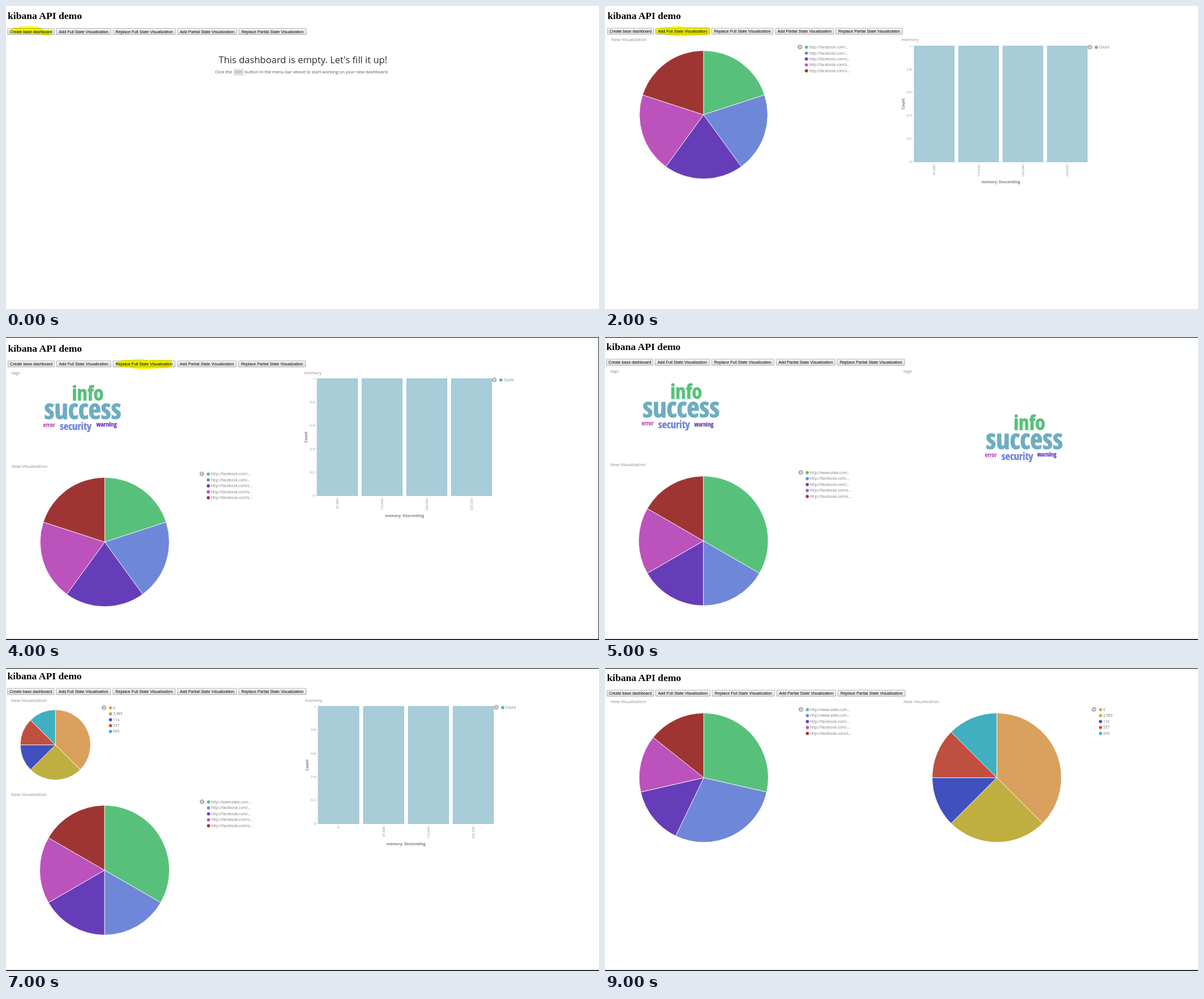
Animation of 1047x535 px, one loop 10 s. Source, as an HTML page:

```html
<!DOCTYPE html>
<html lang="en">
<head>
<meta charset="utf-8">
<title>kibana API demo</title>
<style>
  html, body { margin: 0; width: 100%; height: 100%; overflow: hidden; background: #fff; }
  svg { display: block; }
  text { font-family: "Open Sans", sans-serif; white-space: pre; }
  .head { font-family: "Liberation Serif", "Times New Roman", serif; font-weight: 700; }
  .btn { font-family: "Liberation Sans", Arial, sans-serif; }
  .bold { font-weight: 700; }
  .cloud { font-family: Impact, "Open Sans Condensed", "Open Sans", sans-serif; font-weight: 800; font-stretch: condensed; stroke-width: .025em; }
  .mark { fill: #ff0; mix-blend-mode: multiply; }
</style>
</head>
<body>
<svg id="stage" width="1047" height="535" viewBox="0 0 1047 535">
  <defs>
    <linearGradient id="face" x1="0" y1="0" x2="0" y2="1">
      <stop offset="0" stop-color="#f6f6f6"/>
      <stop offset="1" stop-color="#dcdcdc"/>
    </linearGradient>
  </defs>
</svg>
<script>
const STEP = 1000, LOOP = 10000;
const GREY = '#8a8a8a';
const COOL = ['#57c17b', '#6f87d8', '#663db8', '#bc52bc', '#9e3533'];
const WARM = ['#daa05d', '#bfaf40', '#4050bf', '#bf5040', '#40afbf'];
const FB = 'http://facebook.com/', SLATE = 'http://www.slate.com...';
const URLS = [SLATE, SLATE, FB + '...', FB + '...', FB + 's...', FB + 's...', FB + 's...'];
const SIZES = ['0', '2,989', '116', '557', '609'];
const MEMORY = ['87,880', '170,040', '320,080', '325,320'];
const BUTTONS = [
  ['Create base dashboard', 0, 83.3],
  ['Add Full State Visualization', 86, 97.3],
  ['Replace Full State Visualization', 186, 111],
  ['Add Partial State Visualization', 300, 105.3],
  ['Replace Partial State Visualization', 408, 120]
];

const rect = (x, y, w, h, fill, more = '') =>
  `<rect x="${x}" y="${y}" width="${w}" height="${h}" fill="${fill}" ${more}/>`;
const group = (x, y, k, body) => `<g transform="translate(${x} ${y}) scale(${k})">${body}</g>`;
// y is the middle of the capitals
const text = (x, y, str, size, fill = GREY, more = '') =>
  `<text x="${x}" y="${y + size * .355}" font-size="${size}" fill="${fill}" ${more}>${str}</text>`;
const title = (x, y, str) => text(x, y, str, 7.7);

// Marker strokes, relative to the middle of a button
const SHORT_MARK = 'M-35-4Q-30-8-10-9Q12-10 18-6Q21-3 32-3L36-1Q34 2 35 6Q28 9 18 5Q-4 4-31 4Q-38 0-35-4Z';
const LONG_MARK = 'M-49-3Q-39-8-23-7Q-9-11 5-7Q28-8 47-7Q52-4 48-1Q53 4 43 7Q23 8 5 9Q-13 10-27 6Q-43 6-48 3Z';

function header(x, y, k, marked = -1) {
  let out = text(.5, -27.8, 'kibana API demo', 17.6, '#000', 'class="head"');
  BUTTONS.forEach(([label, left, w], i) => {
    const mid = left + w / 2;
    out += rect(left + .4, -5.5, w - .8, 11, 'url(#face)', 'rx=".8" stroke="#a3a3a3" stroke-width=".8"');
    out += text(mid, 0, label, 7.2, '#000', 'class="btn" text-anchor="middle"');
    if (i === marked) {
      out += `<path class="mark" transform="translate(${mid} 0)" d="${i ? LONG_MARK : SHORT_MARK}"/>`;
    }
  });
  return group(x, y, k, out);
}

function legend(x, y, labels, colors) {
  const caret = `<circle cx="${x}" cy="${y}" r="4.1" fill="#b0b0b0"/>` +
    `<path d="M${x - 1} ${y - 2}l2 2l-2 2" fill="none" stroke="#fff" stroke-width="1.2"/>`;
  return caret + labels.map((label, i) => {
    const cy = y + .4 + i * 10.4;
    return `<circle cx="${x + 11.4}" cy="${cy}" r="2.8" fill="${colors[i]}"/>` +
      text(x + 16, cy, label, 6.5, '#777');
  }).join('');
}

function slices(r, parts, colors) {
  const sum = parts.reduce((a, b) => a + b);
  const at = n => {
    const a = n / sum * 2 * Math.PI;
    return `${(r * Math.sin(a)).toFixed(2)} ${(-r * Math.cos(a)).toFixed(2)}`;
  };
  let from = 0;
  return parts.map((p, i) => {
    const d = `M0 0L${at(from)}A${r} ${r} 0 0 1 ${at(from += p)}Z`;
    return `<path d="${d}" fill="${colors[i]}" stroke="#fff" stroke-width=".8"/>`;
  }).join('');
}

const pie = (x, y, k, parts, labels, colors = COOL) =>
  group(x, y, k, slices(113.2, parts, colors) + legend(170.2, -119.6, labels, colors));

const smallPie = (x, y) =>
  group(x, y, 1, slices(62, [3, 2, 1, 1, 1], WARM) + legend(85.8, -65.6, SIZES, WARM));

function bars(x, y, k, labels = MEMORY) {
  const h = 204.6;
  let out = `<path d="M-1 0V${h}H306" fill="none" stroke="#ddd" stroke-width=".7"/>`;
  for (let i = 0; i <= 5; i++) {
    const ty = h * (1 - i / 5);
    out += rect(-3.5, ty - .3, 2.5, .7, '#ccc') +
      text(-4.6, ty, String(i / 5), 6, GREY, 'text-anchor="end"');
  }
  labels.forEach((label, i) => {
    const left = i * 78.2, mid = left + 35.4;
    out += rect(left + .3, .3, 70.4, h - .3, '#a8cdd9', 'stroke="#7fb6c8" stroke-width=".7"');
    out += rect(mid, h, .6, 2.5, '#ccc');
    out += `<g transform="translate(${mid} ${h + 5}) rotate(-90)">` +
      text(0, 0, label, 5.8, GREY, 'text-anchor="end"') + '</g>';
  });
  out += '<g transform="translate(-19.5 102.5) rotate(-90)">' +
    text(0, 0, 'Count', 6.5, '#777', 'class="bold" text-anchor="middle"') + '</g>';
  out += text(152.8, 240, 'memory: Descending', 6.5, '#7c8187', 'class="bold" text-anchor="middle"');
  return group(x, y, k, out + legend(310, 2, ['Count'], ['#6eadc1']));
}

// word, left, baseline, width, colour
function cloud(x, y, warnX = 94, warnY = 78, warnW = 36) {
  const words = [
    ['info', 51, 31.5, 56, '#57c17b'],
    ['success', 2, 65, 136, '#6eadc1'],
    ['error', 0, 79, 21, '#bc52bc'],
    ['security', 29.5, 84, 56, '#6f87d8'],
    ['warning', warnX, warnY, warnW, '#663db8']
  ];
  return group(x, y, 1, words.map(([w, left, base, width, c]) =>
    `<text class="cloud" x="${left}" y="${base}" font-size="20" data-w="${width}" fill="${c}" stroke="${c}">${w}</text>`
  ).join(''));
}

const edges = rect(0, 0, 1047, 1, '#000') + rect(0, 533.4, 1047, 1.6, '#000');
const sides = rect(0, 0, 5, 535, '#000') + rect(1042, 0, 5, 535, '#000');

const scrollbar = rect(1038.5, 0, 8.5, 535, '#f1f1f1') + rect(1039.3, 5, 7, 493, '#c1c1c1') +
  '<path d="M1040.5 2.5l2.2-2.2l2.2 2.2zM1040.5 529.5h4.4l-2.2 2.3z" fill="#505050"/>';

const empty = () => header(2.5, 45, 1, 0) +
  text(524.3, 95.3, "This dashboard is empty. Let's fill it up!", 16.56, '#2d2d2d', 'text-anchor="middle"') +
  text(369, 116.6, 'Click the', 7.65, '#555') +
  rect(401.5, 111, 18.5, 12, '#e3e3e3', 'rx="1.5"') +
  text(410.8, 117, 'Edit', 6.9, '#888', 'text-anchor="middle"') +
  text(421.8, 116.6, 'button in the menu bar above to start working on your new dashboard.', 7.65, '#555');

const base = marked => header(4, 44.5, .988, marked) +
  title(11, 59.5, 'New Visualization') + title(523, 59.5, 'memory') +
  pie(174, 192, 1, [1, 1, 1, 1, 1], URLS.slice(2)) + bars(546, 70.5, 1);

const tagged = marked => header(3, 47.5, .997, marked) +
  title(10, 63, 'tags') + title(526.5, 63, 'memory') + title(10, 228, 'New Visualization') +
  cloud(65.5, 80) + pie(174.3, 362, 1.007, [1, 1, 1, 1, 1], URLS.slice(2)) +
  bars(549.5, 73.5, 1.009) + edges + rect(1046, 0, 1, 535, '#222');

const replaced = () => header(2, 44.5, .999) +
  title(9, 60, 'tags') + title(527, 60, 'tags') + title(9, 225.5, 'New Visualization') +
  cloud(64.5, 77, 93, 81, 34) + cloud(670.5, 132.5, 92.5, 78, 34) +
  pie(173.7, 360, 1.01, [2, 1, 1, 1, 1], URLS.slice(1, 6)) + edges;

const partial = () => header(7.5, 45.8, .991, 3) +
  title(14, 61, 'New Visualization') + title(528, 61, 'memory') +
  pie(177.5, 194, 1.002, [2, 1, 1, 1, 1], URLS.slice(1, 6)) + bars(551, 71.5, 1.004) + sides;

const added = marked => header(2, 41.5, 1.001, marked) +
  title(9, 57, 'New Visualization') + title(528, 57, 'memory') + title(9, 223, 'New Visualization') +
  smallPie(87.3, 135.7) + pie(174, 357, 1.011, [2, 1, 1, 1, 1], URLS.slice(1, 6)) +
  bars(551.5, 67.5, 1.013, ['0', '87,880', '170,040', '325,320']) + edges;

const final = () => header(3, 44.5, .999) +
  title(10, 59.5, 'New Visualization') + title(527, 59.5, 'New Visualization') +
  pie(174.3, 193.7, 1.008, [2, 2, 1, 1, 1], URLS.slice(0, 5)) +
  pie(691.8, 193.7, 1.008, [3, 2, 1, 1, 1], SIZES, WARM) + edges;

const scenes = [
  empty(), base() + scrollbar, base(1), tagged(), tagged(2),
  replaced(), partial(), added(), added(4), final()
];

const stage = document.getElementById('stage');
stage.insertAdjacentHTML('beforeend', scenes.map(s =>
  `<g class="scene" visibility="hidden">${rect(0, 0, 1047, 535, '#fff')}${s}</g>`).join(''));
const layers = [...stage.querySelectorAll('.scene')];

// Pick the type size of each tag from its weight in the cloud
for (const word of stage.querySelectorAll('.cloud')) {
  const size = 20 * word.dataset.w / word.getComputedTextLength();
  word.setAttribute('font-size', size.toFixed(2));
}

let shown = -1;
function draw(now) {
  const n = Math.floor(now % LOOP / STEP);
  if (n !== shown) {
    layers.forEach((g, i) => g.setAttribute('visibility', i === n ? 'visible' : 'hidden'));
    shown = n;
  }
}
const start = performance.now();
function tick() {
  draw(performance.now() - start);
  requestAnimationFrame(tick);
}
tick();
</script>
</body>
</html>
```
